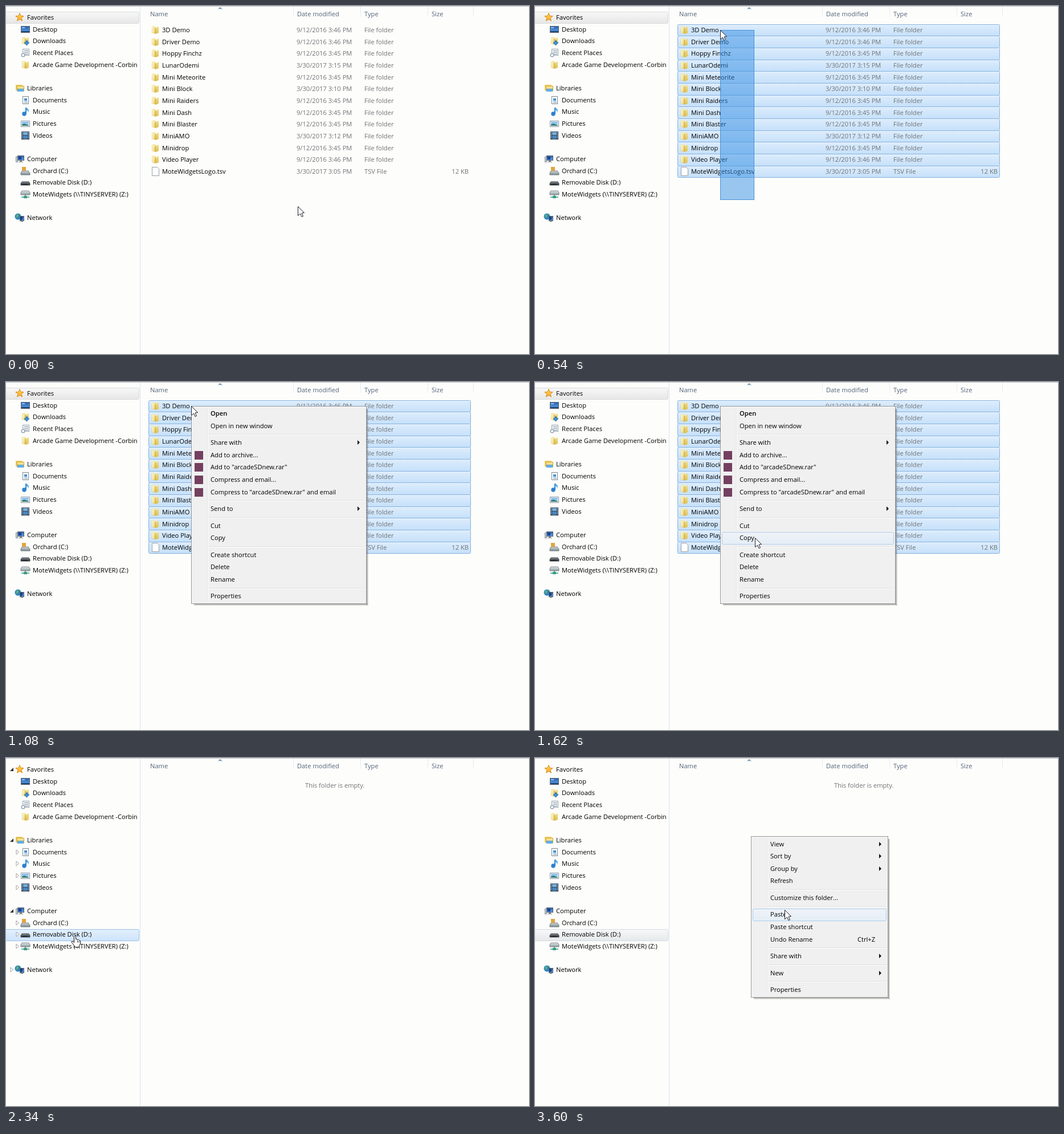
Write an HTML page with a canvas that moves like this. It is 918x610 px and loops after 5100 ms.

```html
<!DOCTYPE html>
<html lang="en">
<head>
<meta charset="utf-8">
<title>Copying folders to a disk</title>
<style>
html, body { margin: 0; width: 100%; height: 100%; overflow: hidden; background: #fdfdfb; }
canvas { display: block; }
</style>
</head>
<body>
<canvas id="stage" width="918" height="610"></canvas>
<script>
const c = document.getElementById('stage').getContext('2d');
const LOOP = 5100, TICK = 180, LAST = 20, ROW = 20.67;
const FONT = '11.15px "Open Sans", "Noto Sans", sans-serif';

const files = [
  ['3D Demo', '9/12/2016 3:46 PM'],
  ['Driver Demo', '9/12/2016 3:46 PM'],
  ['Hoppy Finchz', '9/12/2016 3:45 PM'],
  ['LunarOdemi', '3/30/2017 3:15 PM'],
  ['Mini Meteorite', '9/12/2016 3:45 PM'],
  ['Mini Block', '3/30/2017 3:10 PM'],
  ['Mini Raiders', '9/12/2016 3:45 PM'],
  ['Mini Dash', '9/12/2016 3:45 PM'],
  ['Mini Blaster', '9/12/2016 3:45 PM'],
  ['MiniAMO', '3/30/2017 3:12 PM'],
  ['Minidrop', '9/12/2016 3:45 PM'],
  ['Video Player', '9/12/2016 3:46 PM'],
  ['MoteWidgetsLogo.tsv', '3/30/2017 3:05 PM', 'TSV File', '12 KB']
];

// [row, label, icon, level, expander]
const tree = [
  [0, 'Favorites', 'star', 0, 'open'],
  [1, 'Desktop', 'desktop', 1],
  [2, 'Downloads', 'downloads', 1],
  [3, 'Recent Places', 'recent', 1],
  [4, 'Arcade Game Development -Corbin', 'folder', 1],
  [6, 'Libraries', 'library', 0, 'open'],
  [7, 'Documents', 'doc', 1, 'shut'],
  [8, 'Music', 'music', 1, 'shut'],
  [9, 'Pictures', 'picture', 1, 'shut'],
  [10, 'Videos', 'video', 1, 'shut'],
  [12, 'Computer', 'computer', 0, 'open'],
  [13, 'Orchard (C:)', 'drive', 1, 'shut'],
  [14, 'Removable Disk (D:)', 'disk', 1, 'shut'],
  [15, 'MoteWidgets (\\\\TINYSERVER) (Z:)', 'netdrive', 1, 'shut'],
  [17, 'Network', 'network', 0, 'shut']
];

// '-' separates, '>' opens a submenu, '#' has an icon, '*' is bold, '|' precedes a shortcut
const fileMenu = { x: 325, y: 42, w: 308, items: ['*Open', 'Open in new window', '-', '>Share with',
  '#Add to archive...', '#Add to "arcadeSDnew.rar"', '#Compress and email...',
  '#Compress to "arcadeSDnew.rar" and email', '-', '>Send to', '-', 'Cut', 'Copy', '-',
  'Create shortcut', 'Delete', 'Rename', '-', 'Properties'] };
const diskMenu = { x: 379, y: 137.5, w: 241, items: ['>View', '>Sort by', '>Group by', 'Refresh', '-',
  'Customize this folder...', '-', 'Paste', 'Paste shortcut', 'Undo Rename|Ctrl+Z', '-',
  '>Share with', '-', '>New', '-', 'Properties'] };

// [first step, x, y] of the pointer
const pointer = [[0, 512, 351], [1, 384, 340], [2, 331, 84], [3, 325, 42], [7, 366, 160],
  [8, 386, 273], [11, 119, 311], [14, 383, 163], [15, 379, 137], [18, 398, 166],
  [19, 420, 232], [20, 438, 266]];

function rect(x, y, w, h, fill) {
  c.fillStyle = fill;
  c.fillRect(x, y, w, h);
}

function frame(x, y, w, h, stroke) {
  c.strokeStyle = stroke;
  c.lineWidth = 1;
  c.strokeRect(x + .5, y + .5, w - 1, h - 1);
}

function poly(points, fill, stroke) {
  c.beginPath();
  for (let i = 0; i < points.length; i += 2) c.lineTo(points[i], points[i + 1]);
  c.closePath();
  if (fill) { c.fillStyle = fill; c.fill(); }
  if (stroke) { c.strokeStyle = stroke; c.lineWidth = 1; c.stroke(); }
}

function disc(x, y, r, fill) {
  c.fillStyle = fill;
  c.beginPath();
  c.arc(x, y, r, 0, Math.PI * 2);
  c.fill();
}

function shade(y, h, top, bottom) {
  const g = c.createLinearGradient(0, y, 0, y + h);
  g.addColorStop(0, top);
  g.addColorStop(1, bottom);
  return g;
}

function text(s, x, y, fill = '#000', align = 'left') {
  c.fillStyle = fill;
  c.textAlign = align;
  c.fillText(s, x, Math.round(y + 4));
}

function bar(x, y, w, h, top, bottom, edge) {
  c.beginPath();
  c.roundRect(x + .5, y + .5, w - 1, h - 1, 2);
  c.fillStyle = shade(y, h, top, bottom);
  c.fill();
  c.strokeStyle = edge;
  c.lineWidth = 1;
  c.stroke();
}

function screen(x, y, w, h) {
  rect(x, y, w, h, '#5b6670');
  rect(x + 1, y + 1, w - 2, h - 2, shade(y, h, '#2d5fb0', '#5aa5e4'));
}

// Each icon is drawn around its own centre.
const icons = {
  star() {
    const p = [];
    for (let i = 0; i < 10; i++) {
      const r = i % 2 ? 3.3 : 7.5, a = i * Math.PI / 5 - Math.PI / 2;
      p.push(r * Math.cos(a), r * Math.sin(a));
    }
    poly(p, shade(-7, 14, '#ffd75e', '#f5a623'), '#d98a1c');
  },
  folder() {
    poly([-6, -6, -1, -7, 1, -5, 1, 7, -6, 5], shade(-7, 14, '#f8eba9', '#e2c763'));
    poly([1, -3, 5, -6, 6, -5, 6, 5, 1, 7], shade(-7, 14, '#f3e08d', '#dfc051'));
    rect(-5, -5, 2, 10, '#fbf3c9');
    rect(0, -4, 1, 10, '#c7a947');
  },
  desktop() {
    screen(-8, -6, 16, 12);
    rect(-7, 3, 14, 2, '#25406e');
    rect(-6, -4, 5, 2, '#8fc3f2');
  },
  downloads() {
    icons.folder();
    poly([1, 0, 4, 0, 4, 3, 7, 3, 2.5, 8, -2, 3, 1, 3], '#3d92dc', '#2a6fb5');
  },
  recent() {
    rect(-5, -7, 12, 12, '#eef2f5');
    frame(-5, -7, 12, 12, '#9aa6b0');
    for (let y = -4; y < 3; y += 3) rect(-2, y, 7, 1, '#8295a8');
    disc(-4, 4, 3.5, '#8c9aa6');
    disc(-4, 4, 2.3, '#f4f7f9');
  },
  library() {
    rect(-7, -6, 12, 10, '#eecb5d');
    rect(-5, -4, 13, 9, shade(-4, 9, '#fff0b5', '#e8c049'));
    frame(-5, -4, 13, 9, '#cfa63c');
    rect(-4, 1, 11, 5, '#62aee4');
  },
  doc() {
    rect(-5, -7, 11, 14, '#fff');
    frame(-5, -7, 11, 14, '#7d8b99');
    rect(-2, -3, 5, 4, '#4b8fd0');
    rect(-2, 2, 6, 1, '#8aa0b5');
    rect(-2, 4, 6, 1, '#8aa0b5');
  },
  music() {
    disc(-2, 4, 3.7, '#2b82cf');
    rect(0, -7, 2, 11, '#2b82cf');
    poly([1, -8, 6, -3, 5, 2, 4, -2, 1, -3], '#4ca3e5');
  },
  picture() {
    rect(-8, -5, 16, 11, '#fff');
    frame(-8, -5, 16, 11, '#8794a0');
    rect(-6, -3, 12, 7, shade(-3, 7, '#6db5ec', '#cfe8f5'));
    poly([-6, 4, -6, 1, -1, 0, 6, 3, 6, 4], '#3f7f77');
  },
  video() {
    rect(-7, -7, 14, 14, '#38424f');
    rect(-4, -6, 8, 5, '#6fb1e4');
    rect(-4, 0, 8, 6, '#4785c0');
    for (let y = -6; y < 6; y += 3) {
      rect(-6, y, 1, 2, '#dde4ea');
      rect(5, y, 1, 2, '#dde4ea');
    }
  },
  computer() {
    rect(-7, -4, 4, 10, '#c3cad0');
    frame(-7, -4, 4, 10, '#8b959e');
    screen(-4, -6, 12, 9);
    rect(-2, -4, 5, 5, '#1f3f8c');
    rect(0, 3, 4, 2, '#7d8790');
    rect(-2, 5, 8, 1, '#9ba4ac');
  },
  drive() {
    poly([-6, 0, 5, 0, 8, 4, 8, 7, -8, 7, -8, 4], shade(0, 7, '#d4d9dd', '#7b858d'), '#77818a');
    rect(-6, -7, 7, 7, '#e0a63f');
    rect(4, 4, 2, 1, '#54d058');
  },
  disk() {
    poly([-6, -1, 6, -1, 8, 2, 8, 5, -8, 5, -8, 2], shade(-1, 6, '#8c9298', '#25292d'), '#454b50');
    rect(-6, 3, 10, 1, '#11151a');
  },
  netdrive() {
    poly([-6, -6, 6, -6, 8, -3, 8, 1, -8, 1, -8, -3], shade(-6, 7, '#e2e6e9', '#9099a0'), '#7f8991');
    rect(4, -1, 2, 1, '#4ec653');
    rect(-1, 1, 2, 4, '#49a07a');
    rect(-7, 4, 14, 2, '#6db698');
    rect(-3, 3, 6, 4, '#3c9b85');
  },
  network() {
    disc(-3, -2, 5.5, '#2f86bd');
    poly([-6, -5, -2, -6, -3, -1, -6, 0], '#64b56a');
    screen(0, -3, 8, 9);
    rect(1, -2, 4, 6, '#1d3f86');
    rect(2, 6, 4, 1, '#69737c');
  }
};

function icon(name, x, y) {
  c.save();
  c.translate(Math.round(x), Math.round(y));
  icons[name]();
  c.restore();
}

function sidebar(favLit, diskState, expander) {
  if (favLit) bar(-2, 10, 236, 21, '#f8f8f8', '#e6e6e6', '#d9dadb');
  if (diskState === 'hover') bar(-2, 300, 236, 21, '#fafdff', '#f0f7fe', '#bfdcf3');
  if (diskState === 'active') bar(-2, 300, 236, 21, '#e3f0fd', '#cde3fb', '#9cc3ea');
  if (diskState === 'idle') bar(-2, 300, 236, 21, '#f7f8f9', '#e5e8ea', '#d3dee6');
  c.save();
  c.beginPath();
  c.rect(0, 0, 234, 610);
  c.clip();
  for (const [row, label, name, level, mark] of tree) {
    const y = 20.1 + row * ROW, x = level * 10;
    icon(name, 24 + x, y);
    text(label, 37 + x, y);
    if (!mark || !expander) continue;
    c.globalAlpha = expander;
    const m = 10 + x, n = Math.round(y);
    if (mark === 'open') poly([m + 3, n - 3, m + 3, n + 3, m - 3, n + 3], '#2f2f2f');
    else poly([m - 2, n - 4, m + 2.5, n, m - 2, n + 4], '#fff', '#a0a0a0');
    c.globalAlpha = 1;
  }
  c.restore();
}

function header() {
  rect(0, 0, 918, 1, '#b9c4cf');
  rect(235, 1, 1, 609, '#d7e5f2');
  for (const x of [504, 622, 740, 820]) rect(x, 1, 1, 18, shade(1, 18, '#dce8f2', '#e9f0f6'));
  poly([372, 6, 376, 2, 380, 6, 376, 4.5], '#5d7d99');
  const ink = '#53637a';
  text('Name', 253, 13.5, ink);
  text('Date modified', 511, 13.5, ink);
  text('Type', 629, 13.5, ink);
  text('Size', 747, 13.5, ink);
}

function listing(firstPicked) {
  const ink = '#707376';
  files.forEach(([name, date, type = 'File folder', size], i) => {
    const y = 42 + i * ROW;
    if (i >= firstPicked) {
      // Neighbouring rows share one border line.
      const top = Math.round(y - 10.4), next = Math.round(y - 10.4 + ROW);
      bar(250, top, 566, next - top + 1, '#deedfc', '#c5e0fa', '#82b1de');
      rect(252, top + 1, 562, 1, '#eaf4fe');
    }
    if (size) {
      const top = Math.round(y) - 8;
      poly([256.5, top + .5, 265.5, top + .5, 268.5, top + 3.5, 268.5, top + 15.5, 256.5, top + 15.5], '#fff', '#9a9fa3');
      text(size, 812, y, ink, 'right');
    } else icon('folder', 262, y);
    text(name, 274, y);
    text(date, 510, y, ink);
    text(type, 629, y, ink);
  });
}

function menu({ x, y, w, items }, alpha, hover) {
  const breaks = items.filter(s => s === '-').length;
  const h = Math.round(27 + (items.length - breaks - 1) * 21.65 + breaks * 7.8);
  const top = Math.floor(y);
  for (let i = 3; i > 0; i--) {
    const tone = `rgba(0,0,0,${.42 - i * .1})`;
    rect(x + w + i - 1, top + 5, 1, h - 5 + i, tone);
    rect(x + 5, top + h + i - 1, w - 5 + i, 1, tone);
  }
  c.globalAlpha = alpha;
  rect(x, top, w, h, '#f0f0f0');
  frame(x, top, w, h, '#979797');
  frame(x + 1, top + 1, w - 2, h - 2, '#f7f7f7');
  rect(x + 28, top + 3, 1, h - 6, '#e1e2e2');
  rect(x + 29, top + 3, 1, h - 6, '#fff');

  let cy = y + 13;
  for (const item of items) {
    if (item === '-') {
      const s = Math.round(cy - 7);
      rect(x + 30, s, w - 33, 1, '#dedfdf');
      rect(x + 30, s + 1, w - 33, 1, '#fff');
      cy += 7.8;
      continue;
    }
    const flag = '*>#'.includes(item[0]) ? item[0] : '';
    const [label, keys] = item.slice(flag.length).split('|');
    if (label === hover) bar(x + 3, Math.round(cy - 10.5), w - 6, 22, '#eff3f7', '#e4edf6', '#aecfee');
    if (flag === '*') c.font = '600 ' + FONT;
    text(label, x + 34, cy);
    c.font = FONT;
    if (keys) text(keys, x + 187, cy);
    const n = Math.round(cy);
    if (flag === '>') poly([x + w - 16, n - 4, x + w - 12, n, x + w - 16, n + 4], '#111');
    if (flag === '#') rect(x + 6, n - 7, 15, 15, '#74405f');
    cy += 21.65;
  }
  c.globalAlpha = 1;
}

function cursor(x, y, hand) {
  c.save();
  c.translate(x + .5, y + .5);
  c.lineJoin = 'round';
  if (hand) {
    poly([0, 1, 1, 0, 3, 1, 3, 6, 5, 6, 6, 7, 8, 7, 9, 8, 11, 9, 11, 14, 9, 17, 9, 20,
      1, 20, 0, 17, -4, 12, -4, 10, -2, 10, 0, 12], '#fff', '#111');
    rect(5.5, 8, 1, 4, '#333');
    rect(8, 9, 1, 3, '#333');
  } else {
    poly([0, 0, 0, 16, 4, 12.5, 6.5, 18, 9, 17, 6.5, 11.5, 11, 11], '#fff', '#22222c');
  }
  c.restore();
}

function draw(step) {
  const [, px, py] = pointer.findLast(p => p[0] <= step);
  const opened = step >= 13;
  c.font = FONT;
  rect(0, 0, 918, 610, '#fdfdfb');

  let diskState = '';
  if (step >= 11) diskState = 'hover';
  if (opened) diskState = step === 13 ? 'active' : 'idle';
  const expander = step < 11 ? 0 : step < 17 ? 1 : (LAST - step) / 4;
  sidebar(!opened, diskState, expander);
  header();

  if (opened) text('This folder is empty.', 525, 48, '#707376');
  else listing(step < 2 ? files.length : step < 3 ? 3 : 0);

  if (step === 2 || step === 3) {
    const x = step === 2 ? 332 : 325, y = step === 2 ? 94 : 42;
    rect(x, y, 385 - x, 340 - y, 'rgba(55,144,228,.5)');
    frame(x, y, 385 - x, 340 - y, '#4791d8');
  }
  if (step >= 5 && step <= 9) {
    const hover = step === 7 ? 'Compress and email...' : step > 7 ? 'Copy' : '';
    menu(fileMenu, step === 5 ? .52 : 1, hover);
  }
  if (step >= 16) {
    const hover = { 18: 'Sort by', 19: 'Customize this folder...', 20: 'Paste' }[step];
    menu(diskMenu, step === 16 ? .33 : 1, hover);
  }
  cursor(px, py, step >= 11 && step <= 13);
}

function tick() {
  draw(Math.min(LAST, Math.floor(performance.now() % LOOP / TICK)));
  requestAnimationFrame(tick);
}
tick();
</script>
</body>
</html>
```
